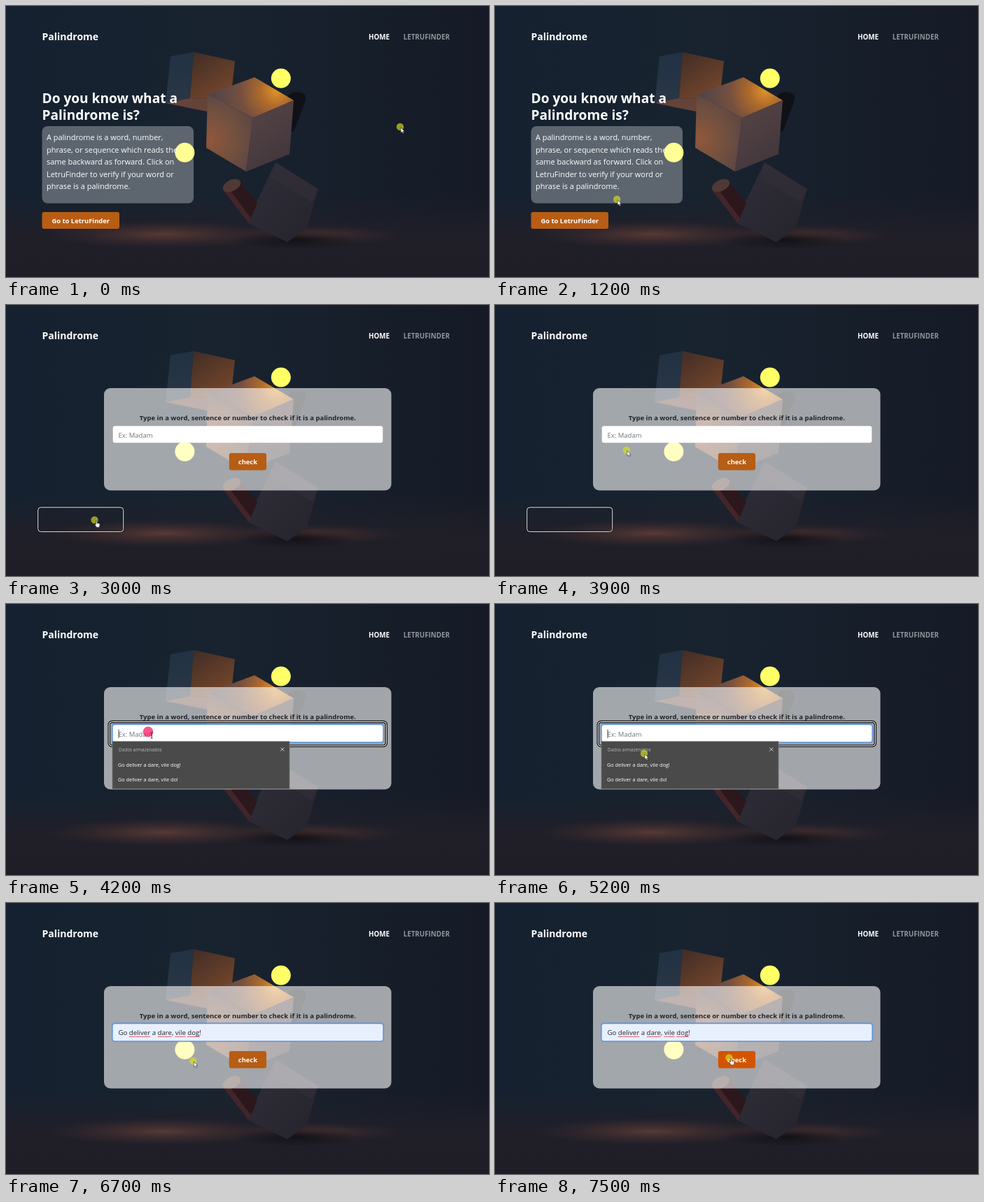
Animation, 690 px wide and 388 px high, one loop 8 s. Source, as an HTML page:

```html
<!DOCTYPE html>
<html lang="en">
<head>
<meta charset="utf-8">
<title>Palindrome</title>
<style>
  html, body { margin: 0; width: 100%; height: 100%; overflow: hidden; background: #17202c; }
  svg { display: block; width: 100vw; height: 100vh; }
  text { font-family: "Open Sans", "Noto Sans", sans-serif; fill: #fff; }
  .b { font-weight: 700; }
  .body { font-size: 10.95px; }
  .h { font-size: 19.1px; }
  .nav { font-size: 9.8px; }
  .btn { font-size: 9.4px; }
  .item { font-size: 7.3px; }
</style>
</head>
<body>
<svg viewBox="0 0 690 388" preserveAspectRatio="none">
  <defs>
    <linearGradient id="wall" x2="1" y2="0">
      <stop offset="0" stop-color="#152130"/>
      <stop offset=".45" stop-color="#18232f"/>
      <stop offset="1" stop-color="#151a26"/>
    </linearGradient>
    <linearGradient id="floor" x2="0" y2="1">
      <stop offset="0" stop-color="#211f28" stop-opacity="0"/>
      <stop offset=".5" stop-color="#211f28" stop-opacity=".9"/>
      <stop offset="1" stop-color="#1f1d26"/>
    </linearGradient>
    <radialGradient id="warm">
      <stop offset="0" stop-color="#6b4238" stop-opacity=".75"/>
      <stop offset="1" stop-color="#4a302e" stop-opacity="0"/>
    </radialGradient>
    <radialGradient id="shade">
      <stop offset="0" stop-color="#0f0f15" stop-opacity=".9"/>
      <stop offset="1" stop-color="#0f0f15" stop-opacity="0"/>
    </radialGradient>
    <linearGradient id="backSide" x1="0" y1="0" x2=".6" y2="1">
      <stop offset="0" stop-color="#3f2c26"/>
      <stop offset="1" stop-color="#74462b"/>
    </linearGradient>
    <linearGradient id="backBlue" x2="0" y2="1">
      <stop offset="0" stop-color="#213244"/>
      <stop offset="1" stop-color="#2a3645"/>
    </linearGradient>
    <radialGradient id="lit" gradientUnits="userSpaceOnUse" cx="386" cy="121" r="92">
      <stop offset="0" stop-color="#e0932a"/>
      <stop offset=".25" stop-color="#ae6a2c"/>
      <stop offset=".55" stop-color="#76503f"/>
      <stop offset="1" stop-color="#50434a"/>
    </radialGradient>
    <radialGradient id="frontLeft" gradientUnits="userSpaceOnUse" cx="292" cy="190" r="80">
      <stop offset="0" stop-color="#90573c"/>
      <stop offset=".5" stop-color="#70503f"/>
      <stop offset="1" stop-color="#544146"/>
    </radialGradient>
    <linearGradient id="frontRight" x1=".2" y1="0" x2=".7" y2="1">
      <stop offset="0" stop-color="#574446"/>
      <stop offset="1" stop-color="#40363b"/>
    </linearGradient>
    <linearGradient id="low" x2="1" y2="1">
      <stop offset="0" stop-color="#302f39"/>
      <stop offset="1" stop-color="#25232c"/>
    </linearGradient>
    <filter id="soft"><feGaussianBlur stdDeviation=".6"/></filter>
  </defs>

  <rect width="690" height="388" fill="url(#wall)"/>
  <rect y="270" width="690" height="118" fill="url(#floor)"/>
  <ellipse cx="225" cy="327" rx="165" ry="20" fill="url(#warm)"/>
  <ellipse cx="440" cy="328" rx="130" ry="15" fill="url(#warm)" opacity=".7"/>
  <ellipse cx="415" cy="335" rx="90" ry="13" fill="url(#shade)"/>
  <g filter="url(#soft)">
    <path d="M235 72L268 66L263 132L228 139Z" fill="url(#backBlue)"/>
    <path d="M268 66L327 79L321 134L263 132Z" fill="url(#backSide)"/>
    <path d="M228 139L263 132L321 134L287 151Z" fill="#664339"/>
    <path d="M403 128Q414 119 426 126Q430 130 427 138L411 180L403 180Z" fill="#0f1117"/>
    <path d="M385 224L446 262L430 318L402 338L344 310Z" fill="url(#low)"/>
    <path d="M385 224L446 262L437 281L379 245Z" fill="#353039" opacity=".6"/>
    <path d="M310 264L335 252L359 282L347 311Z" fill="#2b171c"/>
    <path d="M310 264L318 261L350 304L347 311Z" fill="#42252a"/>
    <ellipse cx="322.5" cy="257" rx="13.5" ry="8" transform="rotate(-25 322.5 257)" fill="#503934"/>
    <path d="M288 127L355 102L411 135L353 160Z" fill="url(#lit)"/>
    <path d="M288 127L353 160L343 237L286 203Z" fill="url(#frontLeft)"/>
    <path d="M353 160L411 135L405 212L343 237Z" fill="url(#frontRight)"/>
  </g>
  <g fill="#ffff66">
    <circle cx="392.8" cy="103.6" r="14"/>
    <circle cx="255.4" cy="209.8" r="14"/>
  </g>

  <text class="b" x="51.5" y="49" font-size="14">Palindrome</text>
  <text class="b nav" x="518" y="47.5">HOME</text>
  <text class="b nav" x="634" y="47.5" text-anchor="end" fill-opacity=".53">LETRUFINDER</text>

  <g id="home">
    <text class="b h" x="51.5" y="139">Do you know what a</text>
    <text class="b h" x="51.5" y="163">Palindrome is?</text>
    <rect x="51.5" y="172" width="216.5" height="110.5" rx="8" fill="#fff" fill-opacity=".3"/>
    <g class="body" id="about"></g>
    <rect id="go" x="51.5" y="295" width="110.5" height="24" rx="3"/>
    <text class="b btn" x="106.8" y="310.6" text-anchor="middle">Go to LetruFinder</text>
  </g>

  <g id="checker">
    <rect x="140" y="119" width="410.5" height="146.5" rx="9" fill="#fff" fill-opacity=".6"/>
    <text class="b" x="345.3" y="164.6" text-anchor="middle" font-size="9.5" style="fill:#212529">Type in a word, sentence or number to check if it is a palindrome.</text>
    <g id="inputRing" fill="none">
      <rect x="147.3" y="168.6" width="396" height="34.6" rx="4" stroke="#15181c" stroke-width="3.6"/>
      <rect x="147.3" y="168.6" width="396" height="34.6" rx="4" stroke="#fff" stroke-width="1"/>
    </g>
    <rect id="glow" x="152" y="172.4" width="387" height="25.6" rx="3.5" fill="none" stroke="#5b95e0" stroke-opacity=".85" stroke-width="2.2"/>
    <rect id="field" x="152.7" y="173.2" width="385.6" height="24" rx="3"/>
    <text id="hint" x="160.5" y="189.6" font-size="9.5" style="fill:#6c757d">Ex: Madam</text>
    <text id="value" x="160.5" y="189.4" font-size="9.65" style="fill:#212529">Go deliver a dare, vile dog!</text>
    <path id="spell" d="M176 191.4H206M217 191.4H237M241.5 191.4H257M259.5 191.4H277" stroke="#e0262c" stroke-width="1" stroke-dasharray="1.6 .6"/>
    <rect id="caret" y="179.5" width=".8" height="12.5" fill="#212529"/>
    <rect id="check" x="318.8" y="212" width="53.2" height="24.6" rx="3"/>
    <text class="b btn" x="345.4" y="228" text-anchor="middle">check</text>
    <g id="list">
      <rect x="152" y="196.8" width="253" height="67.8" fill="#4a4a4a" stroke="#767676" stroke-width=".7"/>
      <rect id="pick" x="152.4" y="219.5" width="252.2" height="21.3" fill="#606060"/>
      <text x="161" y="210.8" font-size="6.45" style="fill:#b9b9b9">Dados armazenados</text>
      <path d="M392.3 205.6l5 5m0-5l-5 5" stroke="#eee" stroke-width=".8"/>
      <text class="item" x="160" y="232.8">Go deliver a dare, vile dog!</text>
      <text class="item" x="160" y="253.8">Go deliver a dare, vile do!</text>
    </g>
  </g>

  <g id="goRing" fill="none">
    <rect x="45.7" y="289.8" width="122" height="34.8" rx="4" stroke="#0c0f14" stroke-opacity=".6" stroke-width="3"/>
    <rect x="45.7" y="289.8" width="122" height="34.8" rx="4" stroke="#e8e8e8" stroke-width="1"/>
  </g>

  <g id="mouse">
    <circle id="dot"/>
    <path id="arrow" d="M1 1v7.6l1.8-1.6l1.2 2.6l1.3-.6l-1.2-2.5h2.3z" fill="#fff" stroke="#111" stroke-width=".5"/>
    <path id="hand" d="M2 1.2q.9-.7 1.5.3v3l3 .6q1.2.4 1 1.6l-.6 3.8h-4l-2.6-3.6q-.1-1.2 1.7-.4z" fill="#fff" stroke="#222" stroke-width=".6"/>
    <path id="beam" d="M3.6 1h3M3.6 9h3M5.1 1v8" fill="none" stroke="#222" stroke-width=".8"/>
  </g>
</svg>
<script>
const LOOP = 8000, STEP = 100;
const $ = id => document.getElementById(id);
const show = (id, on) => $(id).setAttribute("visibility", on ? "inherit" : "hidden");
const set = (id, attrs) => { for (const k in attrs) $(id).setAttribute(k, attrs[k]); };

$("about").innerHTML = [
  "A palindrome is a word, number,",
  "phrase, or sequence which reads the",
  "same backward as forward. Click on",
  "LetruFinder to verify if your word or",
  "phrase is a palindrome."
].map((s, i) => `<text x="58" y="${192 + i * 17.5}">${s}</text>`).join("");

// pointer path: time, x, y
const PATH = [
  [0, 563, 173], [200, 374, 227], [500, 374, 227], [800, 183, 271],
  [1000, 183, 271], [1800, 126.5, 307.7], [3400, 126.5, 307.7],
  [4100, 203, 183], [4600, 203, 183], [5200, 213, 214], [5500, 211, 229.6],
  [6400, 211, 229.6], [6900, 305, 224], [7000, 305, 224],
  [7400, 338, 222], [7500, 334.4, 221.4], [LOOP, 334.4, 221.4]
];
const PRESSES = [[2300, 3000], [4100, 4500], [5800, 6300]];

function pointer(t) {
  const i = PATH.findIndex(k => k[0] > t);
  const [t0, x0, y0] = PATH[i - 1], [t1, x1, y1] = PATH[i];
  let u = (t - t0) / (t1 - t0);
  if (t1 - t0 > 600) u = u * u * (3 - 2 * u);
  return [x0 + (x1 - x0) * u, y0 + (y1 - y0) * u];
}

const inside = (x, y, l, t, r, b) => x >= l && x <= r && y >= t && y <= b;

function draw(now) {
  const t = Math.floor(now % LOOP / STEP) * STEP;
  const within = (a, b) => t >= a && t < b;
  const [x, y] = pointer(t);
  const checker = t >= 3000, focus = t >= 4100;
  const filled = t >= 5300, chosen = t >= 5800;
  const list = within(4200, 5800);
  const onGo = inside(x, y, 51, 295, 162, 319) && t < 3500;
  const onCheck = checker && !list && inside(x, y, 319, 212, 372, 236);
  const onField = checker && inside(x, y, 152, 173, 538, 197);
  const press = PRESSES.some(p => within(...p));

  show("home", !checker);
  show("checker", checker);
  show("goRing", within(2300, 4100));
  show("inputRing", within(4100, 5800));
  show("glow", focus);
  show("hint", checker && !filled);
  show("value", filled);
  show("spell", t >= 5900);
  show("list", list);
  show("pick", list && filled);

  const blink = chosen ? (t - 5800) % 1000 < 500 : focus && !filled && (t - 4200 + 1000) % 1000 < 500;
  show("caret", blink);
  set("caret", { x: chosen ? 279.8 : 160.6 });
  set("field", { fill: filled ? "#e8f0fe" : "#fff" });
  set("go", { fill: onGo ? "#d35400" : "#b75d14" });
  set("check", { fill: onCheck ? "#d35400" : "#b75d14" });

  set("mouse", { transform: `translate(${x.toFixed(2)} ${y.toFixed(2)})` });
  set("dot", press
    ? { r: 7.4, fill: "#fa1e64", "fill-opacity": .75 }
    : { r: 5.2, fill: "#dce11e", "fill-opacity": .65 });
  const hand = onGo || onCheck;
  show("hand", hand);
  show("beam", !hand && onField);
  show("arrow", !hand && !onField);
}

function tick() {
  draw(performance.now());
  requestAnimationFrame(tick);
}
tick();
</script>
</body>
</html>
```
